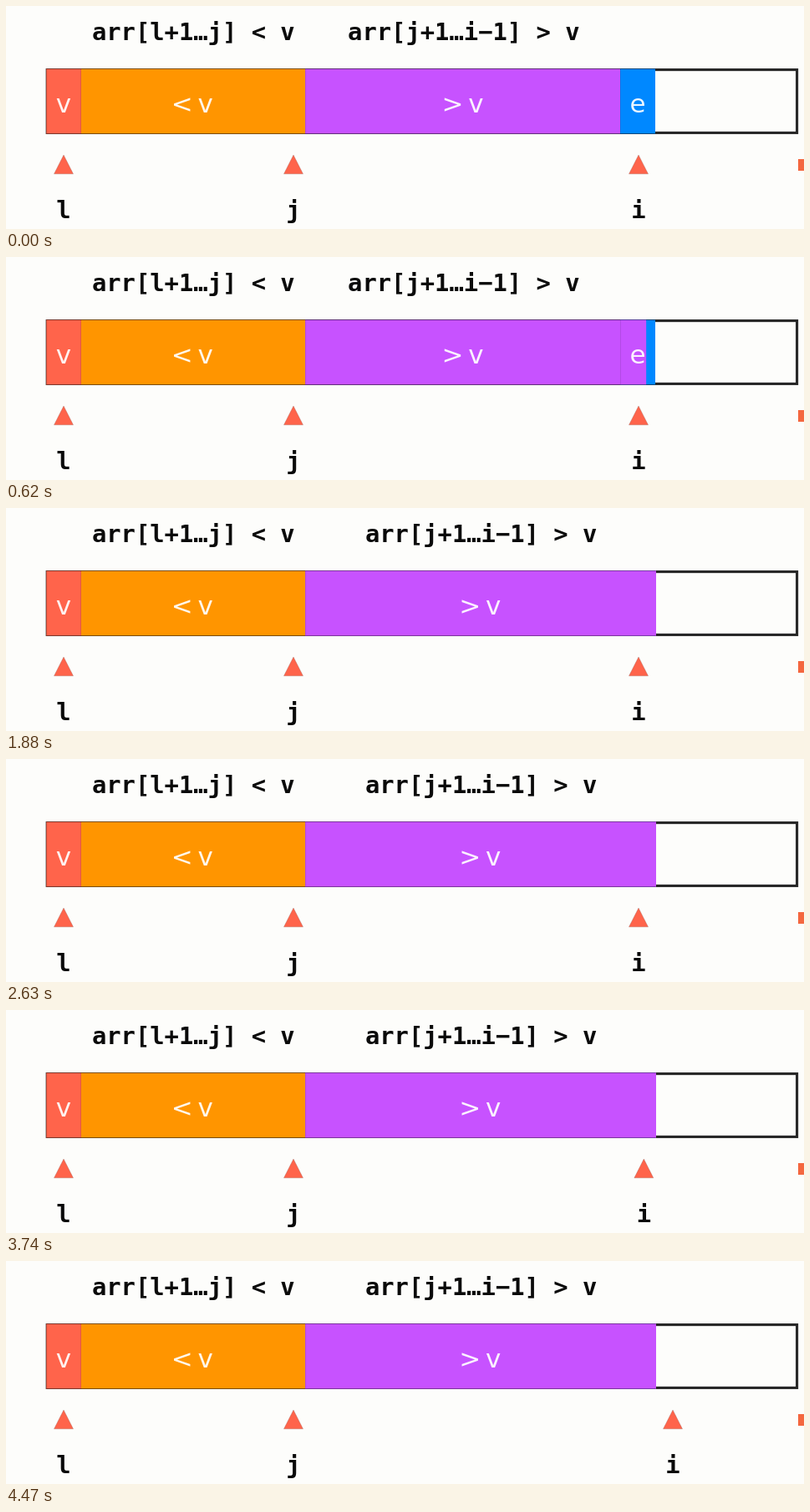
An HTML page that plays this animation: 955x268 px, repeating every 7.53 s.

```html
<!DOCTYPE html>
<html lang="en">
<head>
<meta charset="utf-8">
<title>Partition step</title>
<style>
  html, body { margin: 0; width: 100%; height: 100%; overflow: hidden; background: #fdfdfb; }
  svg { display: block; width: 100%; height: 100%; }
  .code { font: bold 28.8px "DejaVu Sans Mono", "Liberation Mono", monospace; fill: #0a0a0a; text-anchor: middle; }
  .cell { font: 31px "DejaVu Sans", "Liberation Sans", sans-serif; fill: #fff; fill-opacity: .92; text-anchor: middle; }
  .red { fill: #ff644b; }
  .orange { fill: #ff9500; }
  .purple { fill: #c752ff; }
  .blue { fill: #0088ff; }
  .edge { fill: none; stroke: #000; stroke-opacity: .3; stroke-width: 1; }
  .seam { fill: none; stroke: #000; stroke-opacity: .1; stroke-width: 1; }
</style>
</head>
<body>
<svg viewBox="0 0 955 268">
  <defs>
    <path id="arrow" class="red" d="M0 179L11.5 201.8H-11.5Z" stroke="#6b4a44" stroke-opacity=".3" stroke-width=".8"/>
  </defs>
  <rect width="955" height="268" fill="#fdfdfb"/>

  <rect x="49.2" y="76.6" width="897.4" height="75.8" fill="none" stroke="#262626" stroke-width="3.1"/>
  <rect class="red" x="48" y="75.4" width="42" height="78.2"/>
  <rect class="orange" x="90" y="75.4" width="268" height="78.2"/>
  <rect class="purple" x="358" y="75.4" width="377" height="78.2"/>
  <rect class="blue" x="735" y="75.4" width="42" height="78.2"/>
  <rect class="purple" id="wipe" x="735" y="75.4" width="0" height="78.2"/>
  <rect class="purple" id="merged" x="358" y="75.4" width="420" height="78.2"/>
  <path class="edge" d="M48.5 153.5V75.5H777M48.5 153.5H777"/>
  <path class="seam" d="M89.5 76V153M358.5 76V153"/>

  <text class="code" x="224.3" y="41">arr[l+1…j] &lt; v</text>
  <text class="cell" x="69" y="128">v</text>
  <text class="cell" y="128"><tspan x="210.8">&lt;</tspan><tspan x="238.8">v</tspan></text>

  <g id="before">
    <path class="seam" d="M735.5 76V153"/>
    <text class="code" x="547.8" y="41">arr[j+1…i−1] &gt; v</text>
    <text class="cell" y="128"><tspan x="534.5">&gt;</tspan><tspan x="562.5">v</tspan></text>
    <text class="cell" x="756" y="128">e</text>
  </g>
  <g id="after">
    <text class="code" x="568.6" y="41">arr[j+1…i−1] &gt; v</text>
    <text class="cell" y="128"><tspan x="555.3">&gt;</tspan><tspan x="583.3">v</tspan></text>
  </g>

  <g transform="translate(69 0)"><use href="#arrow"/><text class="code" y="255">l</text></g>
  <g transform="translate(344 0)"><use href="#arrow"/><text class="code" y="255">j</text></g>
  <g id="pointer"><use href="#arrow"/><text class="code" y="255">i</text></g>

  <rect x="948" y="184" width="14" height="14" fill="#f4673f"/>
</svg>
<script>
  const LOOP = 7530;
  const $ = id => document.getElementById(id);
  const wipe = $("wipe"), merged = $("merged"), before = $("before"),
        after = $("after"), pointer = $("pointer");

  const progress = (t, from, to) => Math.min(1, Math.max(0, (t - from) / (to - from)));
  const smooth = p => p * p * (3 - 2 * p);

  function draw(t) {
    wipe.setAttribute("width", 42 * progress(t, 250, 750));

    const fade = progress(t, 1110, 1360);
    before.setAttribute("opacity", 1 - fade);
    after.setAttribute("opacity", fade);
    merged.setAttribute("opacity", fade);

    const x = 757 + 41 * smooth(progress(t, 3500, 4470));
    pointer.setAttribute("transform", `translate(${x} 0)`);
  }

  const start = performance.now();
  function tick() {
    draw((performance.now() - start) % LOOP);
    requestAnimationFrame(tick);
  }
  draw(0);
  requestAnimationFrame(tick);
</script>
</body>
</html>
```
